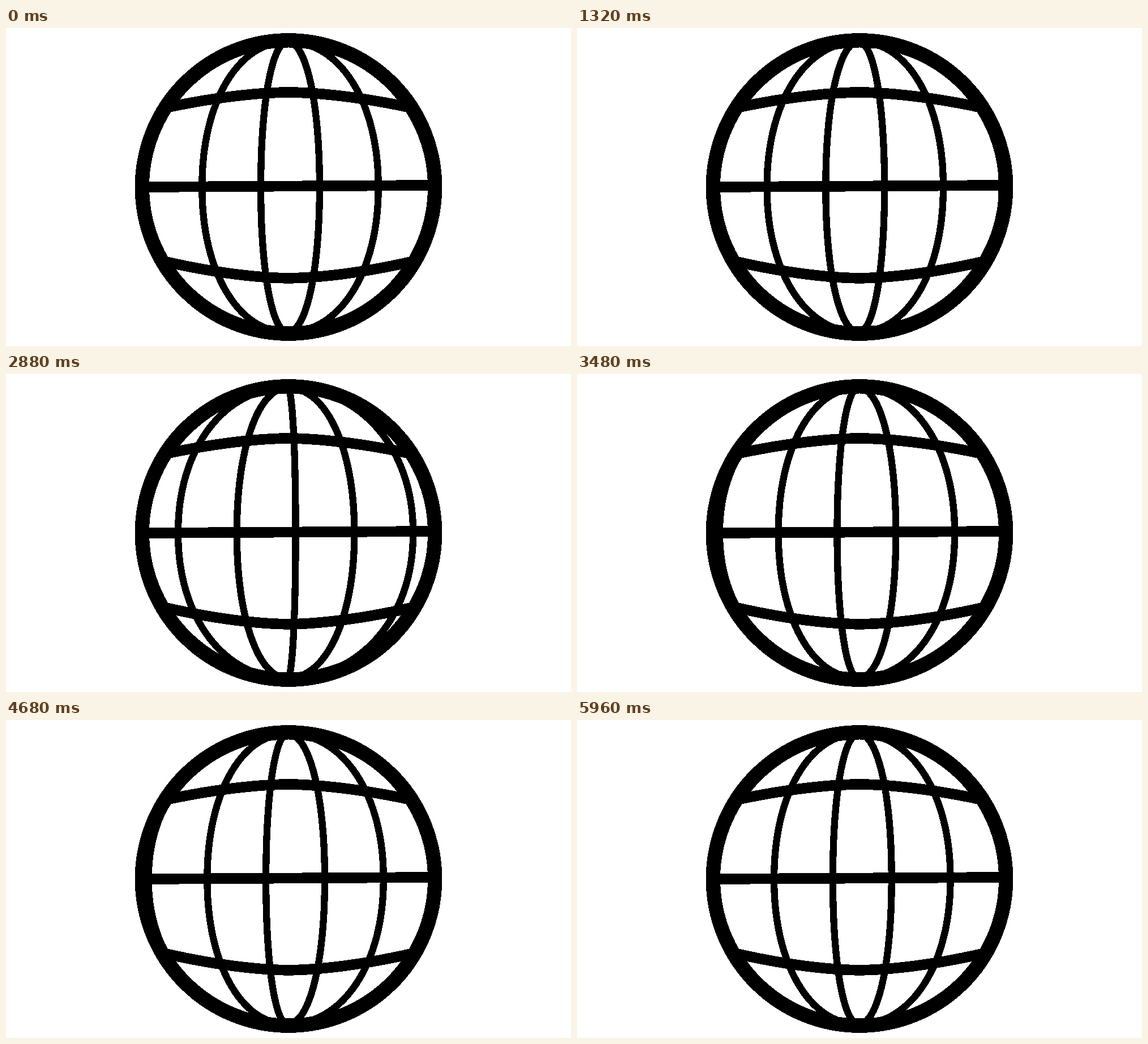
An HTML page that plays this animation: 998x561 px, repeating every 6000 ms.

```html
<!DOCTYPE html>
<html lang="en">
<head>
<meta charset="utf-8">
<title>Turning globe</title>
<style>
  html, body { margin: 0; width: 100%; height: 100%; overflow: hidden; background: #fff; }
  svg { display: block; width: 100vw; height: 100vh; }
  svg * { fill: none; stroke: #000; shape-rendering: crispEdges; }
</style>
</head>
<body>
<svg viewBox="0 0 998 561">
  <circle cx="499" cy="280.5" r="258.7" stroke-width="25.4"/>
  <path d="M250 280.5L748 277.5" stroke-width="18.7"/>
  <path id="north" stroke-width="18.7"/>
  <path id="south" stroke-width="18.7"/>
  <path id="meridians" stroke-width="12.3"/>
</svg>
<script>
const CX = 499, CY = 280.5;
const POLE_X = 497.5;  // where the meridians meet
const POLE = 256;      // half height of a meridian
const GAP = 103.8;     // distance between meridians on the equator
const SPEED = 3.471;   // pixels to the left per step
const START = 56.4;    // first meridian, right of the pole
const STEP = 40, LOOP = 6000;

const $ = id => document.getElementById(id);
const line = points => 'M' + points.map(p => p.map(v => v.toFixed(2)).join(' ')).join('L');

function parallel(y, bend) {
  const points = [];
  for (let d = -216; d <= 216; d += 6) {
    points.push([CX + d, y + bend * Math.abs(d) ** 1.7]);
  }
  return line(points);
}

// Half of a slightly squared ellipse, from pole to pole.
function meridian(a) {
  const points = [], n = 64, power = 2 / 2.1;
  for (let i = 0; i <= n; i++) {
    const u = (i / n - 0.5) * Math.PI;
    const s = Math.sin(u);
    const c = Math.max(0, Math.cos(u));
    points.push([
      POLE_X + a * c ** power,
      CY + POLE * Math.sign(s) * Math.abs(s) ** power
    ]);
  }
  return line(points);
}

function draw(now) {
  const step = Math.floor((now % LOOP) / STEP);
  const shift = (START - SPEED * step) % GAP;
  let d = '';
  for (let k = -3; k <= 4; k++) {
    const a = shift + k * GAP;
    if (Math.abs(a) < 254) d += meridian(a);
  }
  $('meridians').setAttribute('d', d);
}

function tick() {
  draw(performance.now());
  requestAnimationFrame(tick);
}

$('north').setAttribute('d', parallel(113.5, 0.00291));
$('south').setAttribute('d', parallel(441.3, -0.0031));
tick();
</script>
</body>
</html>
```
